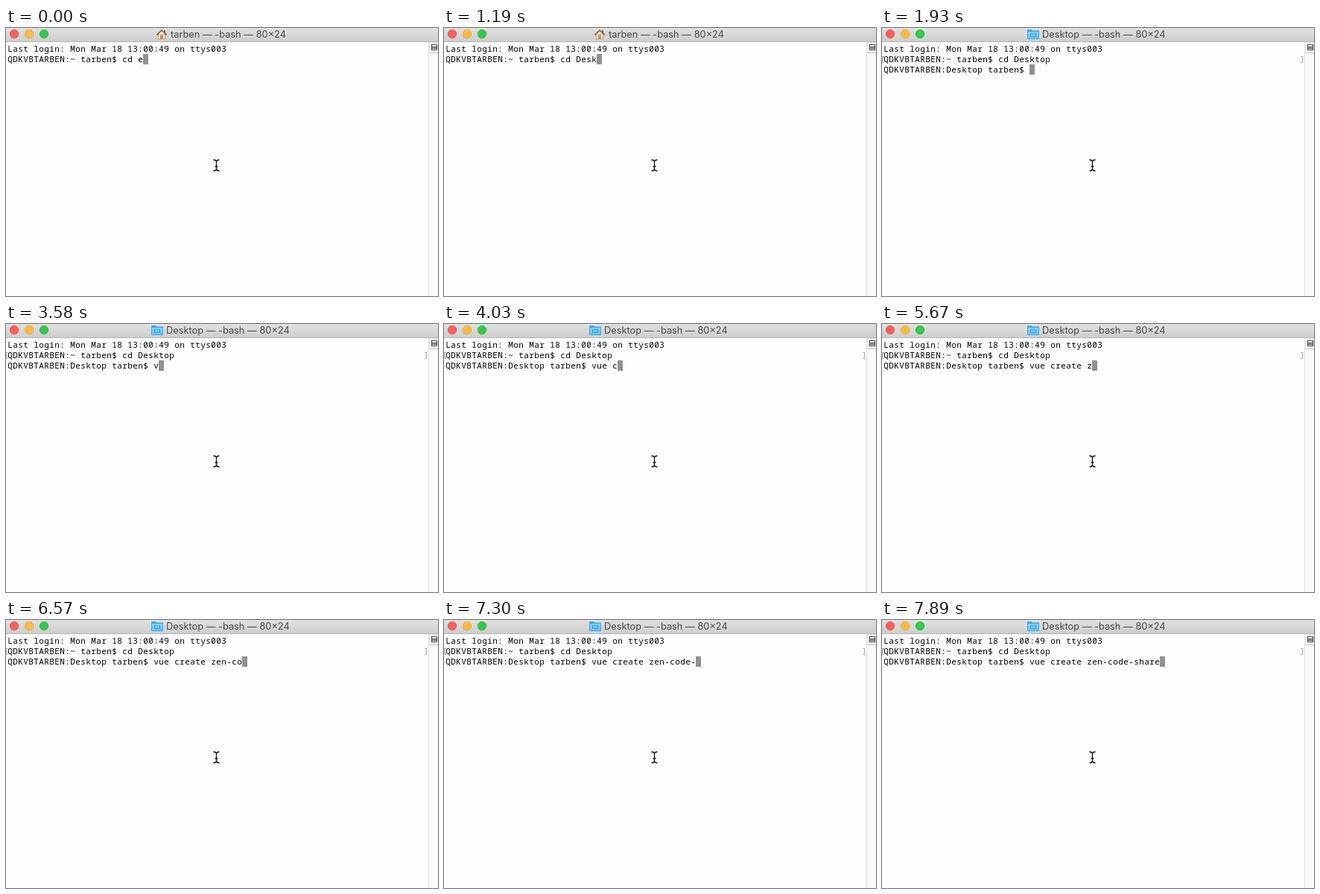
An HTML page with a canvas that plays this animation: 580x361 px, repeating every 8000 ms.

```html
<!DOCTYPE html>
<html lang="en">
<head>
<meta charset="utf-8">
<title>Terminal</title>
<style>
html, body { margin: 0; width: 100%; height: 100%; overflow: hidden; background: #fefefe; }
canvas { display: block; width: 580px; height: 361px; }
</style>
</head>
<body>
<canvas id="stage"></canvas>
<script>
const W = 580, H = 361, LOOP = 8000;
const COL = 7, ROW = 14, LEFT = 2, TOP = 21;
const MONO = '500 11px "Noto Sans Mono", "DejaVu Sans Mono", monospace';
const SANS = '12.8px Inter, "Liberation Sans", sans-serif';
const USER = 'tarben', HOST = 'QDKVBTARBEN';
const ENTER = 1930;

// [time, text typed so far]
const first = [
  [0, 'cd e'], [150, 'cd es'], [590, 'cd '], [740, 'cd D'], [890, 'cd De'],
  [1040, 'cd Des'], [1190, 'cd Desk'], [1490, 'cd Deskto'], [1640, 'cd Desktop']
];
const second = [
  [ENTER, ''], [3580, 'v'], [3730, 'vu'], [3880, 'vue '], [4030, 'vue c'],
  [4180, 'vue cr'], [4330, 'vue cre'], [4480, 'vue crea'], [4620, 'vue create'],
  [4770, 'vue create '], [5670, 'vue create z'], [5820, 'vue create ze'],
  [5970, 'vue create zen'], [6270, 'vue create zen-'], [6420, 'vue create zen-c'],
  [6570, 'vue create zen-co'], [6710, 'vue create zen-cod'], [6860, 'vue create zen-code'],
  [7300, 'vue create zen-code-'], [7450, 'vue create zen-code-s'],
  [7600, 'vue create zen-code-sh'], [7740, 'vue create zen-code-shar'],
  [7890, 'vue create zen-code-share']
];

const canvas = document.getElementById('stage');
const dpr = window.devicePixelRatio || 1;
canvas.width = Math.round(W * dpr);
canvas.height = Math.round(H * dpr);
const c = canvas.getContext('2d');
c.scale(dpr, dpr);

function rect(x, y, w, h, fill) {
  c.fillStyle = fill;
  c.fillRect(x, y, w, h);
}

function poly(points, fill) {
  c.beginPath();
  points.forEach(([x, y]) => c.lineTo(x, y));
  c.closePath();
  c.fillStyle = fill;
  c.fill();
}

function vertical(y0, y1, a, b) {
  const g = c.createLinearGradient(0, y0, 0, y1);
  g.addColorStop(0, a);
  g.addColorStop(1, b);
  return g;
}

function typed(steps, t) {
  let text = '';
  for (const [at, s] of steps) if (t >= at) text = s;
  return text;
}

function line(row, text) {
  c.font = MONO;
  c.fillStyle = '#000';
  c.textAlign = 'center';
  [...text].forEach((ch, i) => {
    c.fillText(ch, LEFT + (i + 0.5) * COL, TOP + row * ROW + 11);
  });
}

function block(row, col) {
  rect(LEFT + col * COL, TOP + row * ROW, COL, ROW, '#919191');
}

function light(x, fill, edge) {
  c.beginPath();
  c.arc(x, 8, 5.7, 0, Math.PI * 2);
  c.fillStyle = fill;
  c.fill();
  c.strokeStyle = edge;
  c.lineWidth = 0.8;
  c.stroke();
}

function house() {
  rect(204, 8, 10, 7, '#f4f1ea');
  c.strokeStyle = '#9a8d80';
  c.lineWidth = 0.8;
  c.strokeRect(204.4, 8.4, 9.2, 6.4);
  rect(212, 3, 2, 4, '#8a6048');
  poly([[209, 2], [216.5, 9], [215, 10], [209, 4.6], [203, 10], [201.5, 9]], '#8d6044');
  poly([[209, 4.6], [213, 8.3], [205, 8.3]], '#f4f1ea');
  rect(207, 9.5, 4, 5.3, '#d98a3a');
}

function folder() {
  poly([[196, 2], [201, 2], [202.5, 3.5], [211, 3.5], [211, 15], [195, 15], [195, 3]], '#3fa5dc');
  rect(196, 5, 14, 9, vertical(5, 14, '#86d5fa', '#66c3f1'));
  c.strokeStyle = '#3b9fd5';
  c.lineWidth = 1;
  c.strokeRect(199.5, 7.5, 7, 4);
}

function titleBar(moved) {
  rect(0, 0, W, 18, vertical(0, 18, '#e0e0e0', '#cecece'));
  rect(0, 18, W, 1, '#b5b5b5');
  light(11, '#fc605b', '#df4744');
  light(31, '#fdbc40', '#dea034');
  light(51, '#34c84a', '#27aa35');
  moved ? folder() : house();
  c.font = SANS;
  c.fillStyle = '#484848';
  c.textAlign = 'left';
  c.fillText((moved ? 'Desktop' : USER) + ' — -bash — 80×24', moved ? 215 : 221, 13);
}

function scrollBar() {
  rect(567, 19, 13, H - 19, '#fafafa');
  rect(567, 19, 1, H - 19, '#dedede');
  rect(568, 19, 12, 14, '#eeeeee');
  rect(568, 33, 12, 1, '#c6c6c6');
  rect(571, 22, 8, 8, '#454545');
  rect(572, 23, 6, 2, '#f2f2f2');
  rect(572, 26, 6, 1, '#b8b8b8');
  rect(572, 28, 6, 1, '#f2f2f2');
}

function beam() {
  c.beginPath();
  c.moveTo(278.5, 177.5);
  c.quadraticCurveTo(282, 177.5, 282.5, 180);
  c.quadraticCurveTo(283, 177.5, 286.5, 177.5);
  c.moveTo(282.5, 179.5);
  c.lineTo(282.5, 190.5);
  c.moveTo(278.5, 192.5);
  c.quadraticCurveTo(282, 192.5, 282.5, 190);
  c.quadraticCurveTo(283, 192.5, 286.5, 192.5);
  c.moveTo(280.5, 186.5);
  c.lineTo(284.5, 186.5);
  c.lineWidth = 1.3;
  c.strokeStyle = '#111';
  c.stroke();
}

function bracket(x, dir) {
  rect(x, 38, 1, 9, '#a4a4a4');
  const tip = dir > 0 ? x + 1 : x - 2;
  rect(tip, 38, 2, 1, '#b4b4b4');
  rect(tip, 46, 2, 1, '#b4b4b4');
}

function draw(t) {
  const moved = t >= ENTER;
  rect(0, 0, W, H, '#fefefe');
  titleBar(moved);
  scrollBar();
  line(0, 'Last login: Mon Mar 18 13:00:49 on ttys003');
  const home = `${HOST}:~ ${USER}$ ` + typed(first, t);
  line(1, home);
  if (moved) {
    bracket(0, 1);
    bracket(564, -1);
    const desk = `${HOST}:Desktop ${USER}$ ` + typed(second, t);
    line(2, desk);
    block(2, desk.length);
  } else {
    block(1, home.length);
  }
  beam();
}

const start = performance.now();
function tick() {
  draw((performance.now() - start) % LOOP);
  requestAnimationFrame(tick);
}
tick();
</script>
</body>
</html>
```
